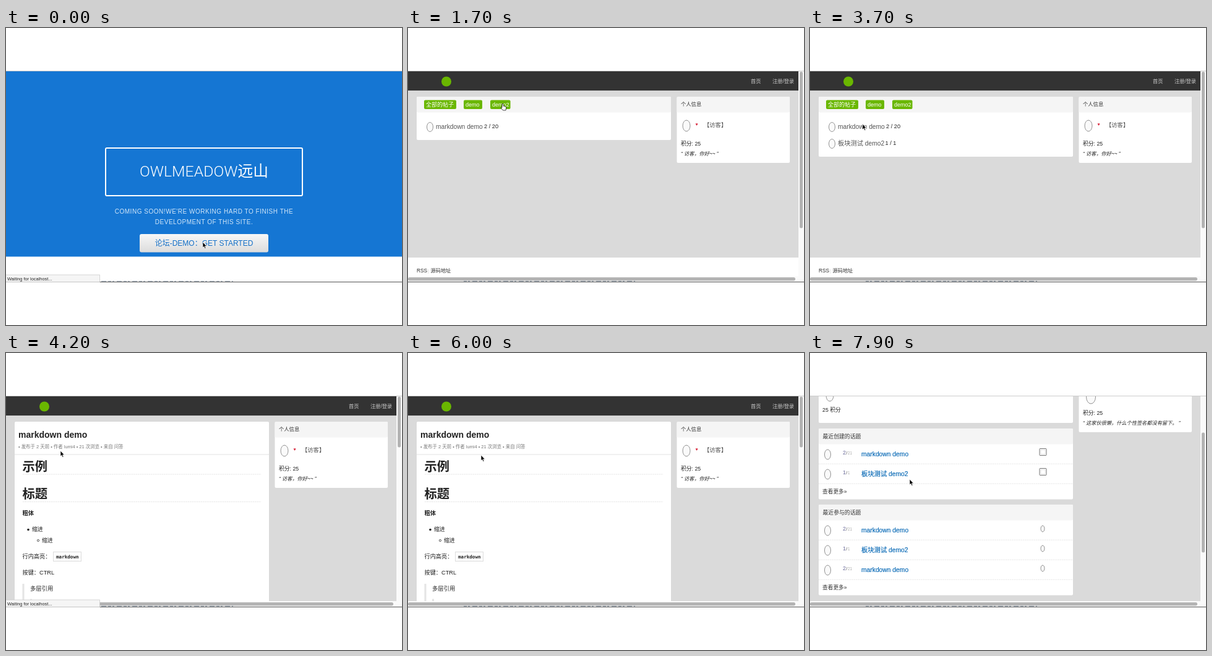
An HTML page for the animation above (8000 ms loop, 640 by 480 pixels).

```html
<!DOCTYPE html>
<html lang="zh-CN">
<head>
<meta charset="utf-8">
<title>Forum demo</title>
<style>
html, body { margin: 0; width: 100%; height: 100%; overflow: hidden; background: #fff; }
svg { display: block; width: 640px; height: 480px; }
text { font-family: "Liberation Sans", "Noto Sans CJK SC", "Noto Sans CJK", sans-serif; white-space: pre; }
</style>
</head>
<body>
<svg id="stage" viewBox="0 0 640 480"></svg>
<script>
const AUTHOR = 'lumi4';
const LINK = '#0a6ab6';

// Drawing helpers; text is placed by its vertical centre
const text = (x, y, size, str, fill = '#222', extra = '') =>
  `<text x="${x}" y="${y + size * 0.36}" font-size="${size}" fill="${fill}" ${extra}>${str}</text>`;
const rect = (x, y, w, h, fill, extra = '') =>
  `<rect x="${x}" y="${y}" width="${w}" height="${h}" fill="${fill}" ${extra}/>`;
const line = (x1, y1, x2, y2, stroke, extra = '') =>
  `<path d="M${x1} ${y1}L${x2} ${y2}" stroke="${stroke}" ${extra}/>`;
const avatar = (x, y, rx = 5, ry = 7.5) =>
  `<ellipse cx="${x}" cy="${y}" rx="${rx}" ry="${ry}" fill="#fafafa" stroke="#777" stroke-width=".8"/>`;
const bold = 'font-weight="bold"';
const middle = 'text-anchor="middle"';
const dashed = 'stroke-dasharray="2 1"';

const panel = (x, y, w, h, title = '') =>
  rect(x, y, w, h, '#fff', 'rx="2"') +
  rect(x, y, w, 25.5, '#f5f5f5', 'rx="2"') +
  text(x + 6.5, y + 12.5, x > 400 ? 8.3 : 8.85, title, '#333');

const sidebar = (face, motto) =>
  panel(434.5, 111, 182.5, 107, '个人信息') + face +
  text(441, 187, 8.8, '积分: 25') +
  text(441, 203.5, 8.2, `“ ${motto} ”`, '#222', 'font-style="italic"');

const guest = sidebar(
  avatar(450, 158, 6, 9) + text(464.5, 155.5, 7, '♥', '#d8263c') +
  text(478, 156.5, 9.3, '【访客】', '#555'), '访客，你好~~');

const shell = (body, footerY) =>
  rect(0, 69, 631, 1400, '#dadada') +
  rect(0, 70, 631, 31, '#333') + line(0, 101.5, 631, 101.5, '#cfcfcf') +
  `<circle cx="62" cy="86.5" r="8" fill="#6ab700"/>` +
  text(554, 86, 8.2, '首页', '#ccc') + text(589, 86, 8.2, '注册/登录', '#ccc') +
  body + rect(0, footerY, 631, 132, '#fff') +
  text(14, footerY + 21, 8.3, 'RSS', '#333') + text(32, footerY + 21, 7, '|', '#ccc') +
  text(36.5, footerY + 21, 8.2, '源码地址', '#333');

const badge = (x, w, str) =>
  rect(x, 116.5, w, 14.5, '#6ab700', 'rx="2"') + text(x + 3, 123.7, 9, str, '#fff');

const topics = [['markdown demo', '2 / 20', 123], ['板块测试 demo2', '1 / 1', 121.5]];
const list = rows => shell(
  panel(14, 111, 411, 43 + 27 * rows.length) +
  badge(26, 52, '全部的帖子') + badge(90, 30, 'demo') + badge(133, 32.5, 'demo2') +
  rows.map((r, i) => {
    const y = 159 + 27 * i, [name, count, x] = topics[r];
    return avatar(35.5, y + 1) + text(45, y, 10.25, name, '#555') + text(x, y - 0.7, 9.2, count);
  }).join('') + guest, 371);

const bar = (x, y, h) => rect(x, y, 3, h, '#e4e4e4');
const heading = (y, str) =>
  text(26.5, y, 20.3, str, '#222', bold) + line(27, y + 12.5, 412, y + 12.5, '#e4e4e4', dashed);

const article = shell(
  rect(14, 111, 411, 1140, '#fff', 'rx="2"') +
  text(20, 131.5, 14, 'markdown demo', '#222', bold) +
  text(20, 151.3, 7.45, `• 发布于 2 天前 • 作者 ${AUTHOR} • 21 次浏览 • 来自 问答`, '#777') +
  line(14, 164, 425, 164, '#e2e2e2') +
  heading(183.5, '示例') + heading(228, '标题') +
  text(26.5, 258.5, 9.3, '粗体', '#222', bold) +
  '<circle cx="36" cy="285.5" r="1.8" fill="#222"/>' + text(42, 285, 8.9, '缩进') +
  '<circle cx="52" cy="303" r="1.6" fill="none" stroke="#222" stroke-width=".7"/>' + text(58, 302.3, 8.9, '缩进') +
  text(26.5, 328.5, 9.2, '行内高亮：') +
  rect(76.5, 321.5, 45, 15, '#fcfcfc', 'stroke="#ddd"') +
  text(81, 329, 7.6, 'markdown', '#222', bold + ` style="font-family:'DejaVu Sans Mono',monospace"`) +
  text(26.5, 354.5, 9.2, '按键：CTRL') +
  bar(26.5, 373, 41) + text(39, 380.3, 9.3, '多层引用') +
  bar(39, 397.5, 16.5) + text(52, 406, 9.3, '多层引用') +
  text(26.5, 435, 9.3, '－－－－', '#222', bold) +
  bar(26.5, 452, 32) + text(39, 460, 9.3, '单层引用') + text(39, 476, 9.3, '单层引用') +
  [0, 1, 2, 3].map(i => {
    const x = 26.5 + 34.7 * (i % 2), y = 496.5 + 26 * (i >> 1);
    return rect(x, y, 34.7, 26, 'none', 'stroke="#ccc"') + text(x + 8.5, y + 13, 9, '表格', '#222', i < 2 ? bold : '');
  }).join('') + guest, 1274);

const activity = (y, title, rows, icon) =>
  panel(14, y, 411, 50.5 + 32 * rows.length, title) +
  rows.map((r, i) => {
    const cy = y + 41 + 32 * i, [a, b] = r ? [1, 1] : [2, 21];
    return avatar(28.5, cy + 1, 5, 8) +
      text(53, cy - 2.5, 9, a, '#6a6a9a') + text(58.2, cy - 2, 7.5, '/', '#555') + text(61, cy - 1.7, 6.3, b, '#aaa') +
      text(83, cy, 10.3, topics[r][0], LINK, `stroke="${LINK}" stroke-width=".2"`) +
      icon(cy) + line(14, cy + 16.2, 425, cy + 16.2, '#e6e6e6', dashed);
  }).join('') + text(20, y + 38 + 32 * rows.length, 8.7, '查看更多»', '#333');

const emptyIcon = y => rect(371, y - 8.5, 11, 11, '#fff', 'rx="1" stroke="#666" stroke-width=".9"') +
  rect(373, y - 6.5, 7, 7, 'none', 'stroke="#ccc" stroke-width=".5"');
const faceIcon = y => avatar(376, y - 2, 3, 5);

const profile = shell(
  panel(14, 111, 411, 92, '主页 /') + avatar(32, 159, 6, 9) + text(45, 157, 9.3, AUTHOR, '#555') +
  text(20, 182.3, 8.8, '25 积分') +
  activity(212, '最近创建的话题', [0, 1], emptyIcon) +
  activity(335, '最近参与的话题', [0, 1, 0], faceIcon) +
  sidebar(avatar(454, 161, 7.5, 11) + text(482, 156.5, 9.3, AUTHOR, '#555'),
    '这家伙很懒，什么个性签名都没有留下。'), 503);

const spaced = middle + ' letter-spacing=".53"';
const landing =
  rect(0, 70, 640, 299.5, '#1576d3') +
  rect(161, 194, 318, 77, 'none', 'rx="2" stroke="#fff" stroke-width="2"') +
  text(320, 231, 24.8, 'OWLMEADOW远山', '#fff',
    middle + ` style="font-family:Roboto,'Noto Sans CJK SC','Noto Sans CJK',sans-serif;font-weight:300"`) +
  text(320, 296.5, 10, "COMING SOON!WE'RE WORKING HARD TO FINISH THE", '#d2e6f8', spaced) +
  text(320, 313.7, 10, 'DEVELOPMENT OF THIS SITE.', '#d2e6f8', spaced) +
  '<linearGradient id="btn" x2="0" y2="1"><stop stop-color="#f7f7f7"/><stop offset="1" stop-color="#dcdcdc"/></linearGradient>' +
  rect(216, 333, 208, 29.5, 'url(#btn)', 'rx="3"') +
  text(320, 348, 12, '论坛-DEMO：GET STARTED', '#1470c8', middle);

// thumb: scrollbar height, rate: thumb travel per scrolled pixel
const pages = {
  landing: { art: landing },
  all: { art: list([0, 1]), thumb: 253, rate: 0 },
  demo: { art: list([0]), thumb: 253, rate: 0 },
  demo2: { art: list([1]), thumb: 253, rate: 0 },
  article: { art: article, thumb: 82, rate: 38 / 139 },
  profile: { art: profile, thumb: 194, rate: 58 / 90 }
};

const stage = document.getElementById('stage');
stage.innerHTML =
  '<clipPath id="view"><rect y="70" width="640" height="331"/></clipPath><g clip-path="url(#view)">' +
  Object.keys(pages).map(k => `<g id="${k}">${pages[k].art}</g>`).join('') + '</g>' +
  line(0, 69.5, 640, 69.5, '#ccc') +
  '<g id="bars">' + rect(631, 70, 9, 331, '#fafafa') + rect(0, 401, 640, 9, '#fafafa') +
  rect(0, 403, 626, 5.5, '#b3b3b3', 'rx="2.7"') + rect(633, 71, 5, 80, '#b3b3b3', 'rx="2.5" id="thumb"') + '</g>' +
  line(90, 409.3, 367, 409.3, '#68788a', 'stroke-width=".8" stroke-dasharray="5 2 3 4 8 3"') +
  line(0, 410.5, 640, 410.5, '#555') +
  '<g id="status">' + rect(-1, 399, 152.5, 11.5, '#f5f5f5', 'stroke="#ccc" stroke-width=".8"') +
  text(2, 405, 7.4, 'Waiting for localhost...') + '</g>' +
  '<g id="cursor" stroke="#fff" stroke-width=".7">' +
  '<path id="arrow" d="M0 0V9L2 7.2L3.5 10.5L5 9.8L3.6 6.7H6.3Z" fill="#000"/>' +
  '<path id="hand" d="M1 1Q2 -.5 3 1V4L7 5Q8 5.3 7.7 7L7 11H2.5L-.8 7Q-.5 5.5 1 6.5Z" fill="#fff" stroke="#000"/></g>';
const el = id => document.getElementById(id);

const visits = [[0, 'landing'], [400, 'all'], [1200, 'demo'], [2000, 'demo2'], [3000, 'all'], [4100, 'article'], [6600, 'profile']];
const waits = [[0, 400], [1100, 1300], [1900, 2100], [2800, 3100], [4000, 4400], [6500, 6700]];
const hands = [[900, 1200], [1600, 2000], [3800, 4100], [6400, 6600]];
const scrolls = [[4500, 0], [5100, 139], [5500, 139], [5900, 0], [6900, 0], [7500, 90]];
const moves = [[0, 318, 346], [300, 318, 346], [900, 104, 123], [1200, 104, 123], [1600, 151, 122], [2000, 151, 122],
  [2700, 45, 119], [3200, 45, 119], [3800, 88, 158], [4300, 88, 158], [4800, 154, 210], [5500, 154, 210],
  [6000, 118, 165], [6400, 100, 152], [6700, 100, 152], [7200, 161, 204]];

const within = (spans, t) => spans.some(([a, b]) => t >= a && t < b);
function at(keys, t, axis = 1) {
  const i = keys.findIndex(k => k[0] > t);
  if (i === 0) return keys[0][axis];
  if (i < 0) return keys[keys.length - 1][axis];
  const a = keys[i - 1], b = keys[i], u = (t - a[0]) / (b[0] - a[0]);
  return a[axis] + (b[axis] - a[axis]) * u * u * (3 - 2 * u);
}
const show = (id, on) => el(id).setAttribute('display', on ? 'inline' : 'none');

const start = performance.now();
function draw() {
  const t = Math.floor((performance.now() - start) % 8000 / 100) * 100;
  const name = visits.filter(v => v[0] <= t).pop()[1], page = pages[name];
  const scroll = Math.round(at(scrolls, t));
  Object.keys(pages).forEach(k => show(k, k === name));
  el(name).setAttribute('transform', `translate(0 ${-scroll})`);
  show('bars', page.thumb);
  if (page.thumb) {
    el('thumb').setAttribute('height', page.thumb);
    el('thumb').setAttribute('y', 70.5 + scroll * page.rate);
  }
  show('status', within(waits, t));
  const hand = within(hands, t);
  show('hand', hand);
  show('arrow', !hand);
  el('cursor').setAttribute('transform', `translate(${at(moves, t)} ${at(moves, t, 2)})`);
  requestAnimationFrame(draw);
}
draw();
</script>
</body>
</html>
```
